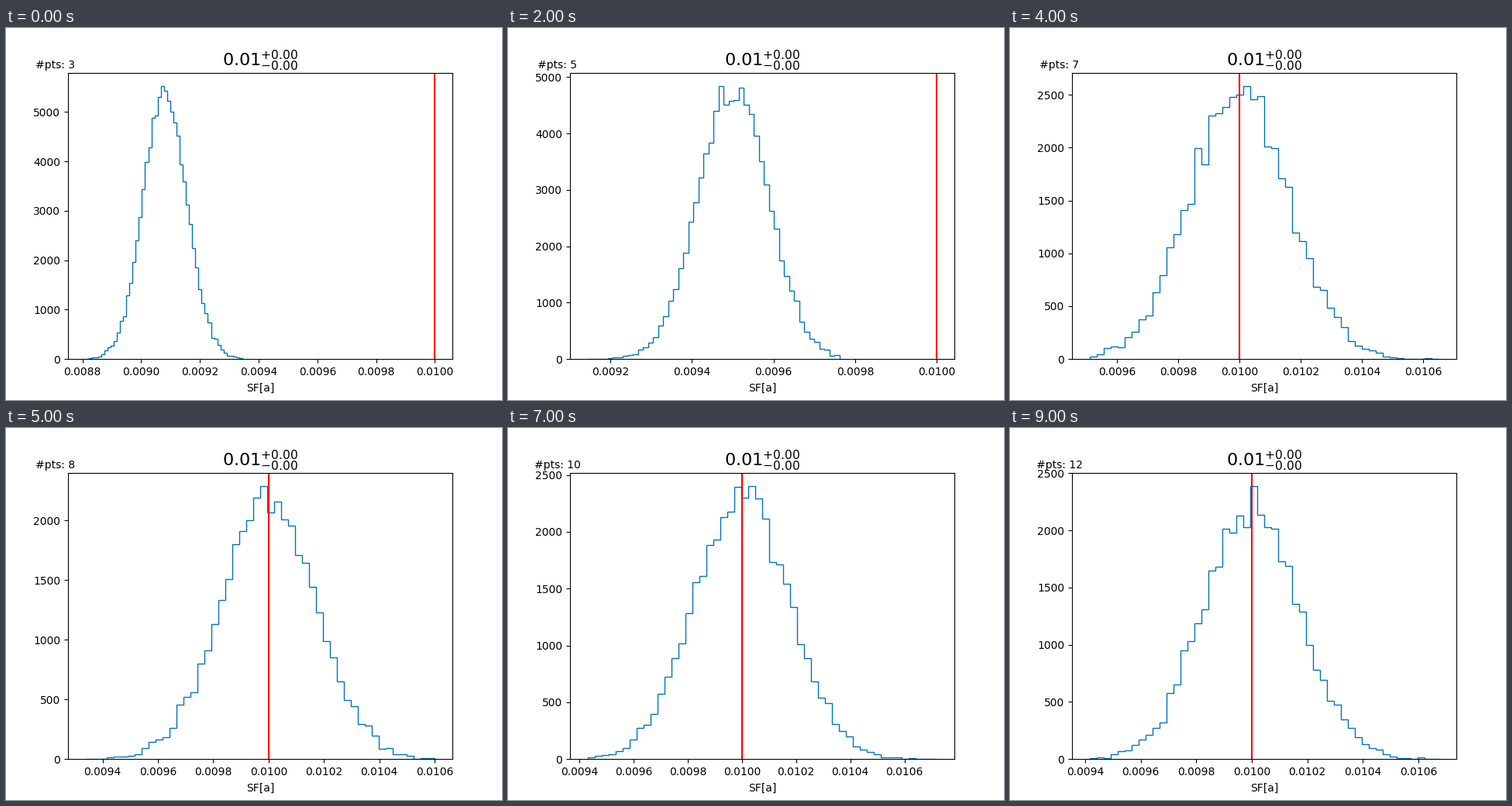
Animation of 640 by 480 pixels, one loop 10 s. Source, as a matplotlib script:

```python
import numpy as np
import matplotlib.pyplot as plt
from matplotlib.animation import FuncAnimation

BINS = 50
FIRST_COUNT = 3
TRUE_VALUE = 0.01

# per step: lowest sample, highest sample, tallest bin
RANGES = [
    (0.0088103, 0.0093445, 5520),
    (0.0089810, 0.0095700, 5250),
    (0.0091440, 0.0097609, 4838),
    (0.0094820, 0.0104941, 3203),
    (0.0095100, 0.0106520, 2580),
    (0.0093382, 0.0106014, 2285),
    (0.0094434, 0.0106268, 2396),
    (0.0094300, 0.0107200, 2400),
    (0.0094480, 0.0108397, 2560),
    (0.0094154, 0.0106740, 2385),
]

fig, ax = plt.subplots(figsize=(6.4, 4.8), dpi=100)
label = fig.text(0.1, 0.9, "", ha="center", va="center")


def center(step):
    """Climbs steadily, then settles on the true value."""
    return 0.00908 + 0.00021 * step if step < 3 else TRUE_VALUE


def spread(step):
    """Widens along an S-curve as points are added."""
    return 7.4e-5 + 1e-4 / (1 + np.exp(-2 * (step - 3)))


def histogram(step):
    low, high, peak = RANGES[step]
    edges = np.linspace(low, high, BINS + 1)
    mids = (edges[:-1] + edges[1:]) / 2
    counts = peak * np.exp(-0.5 * ((mids - center(step)) / spread(step)) ** 2)
    noise = np.random.default_rng(step).normal(size=BINS)
    counts = np.maximum(counts + noise * np.sqrt(4 * counts), 0)
    return mids, edges, counts * peak / counts.max()


def draw(step):
    ax.cla()
    mids, edges, counts = histogram(step)
    ax.hist(mids, edges, weights=counts, histtype="step", color="#0072bd")
    ax.axvline(TRUE_VALUE, color="red")
    ax.set_title("$0.01^{+0.00}_{-0.00}$", fontsize=16)
    ax.set_xlabel("SF[a]", labelpad=4.7)
    label.set_text(f"#pts: {FIRST_COUNT + step}")
    return ()


anim = FuncAnimation(fig, draw, frames=len(RANGES), interval=1000,
                     init_func=lambda: draw(0), repeat=True, repeat_delay=0)
plt.show()
```
